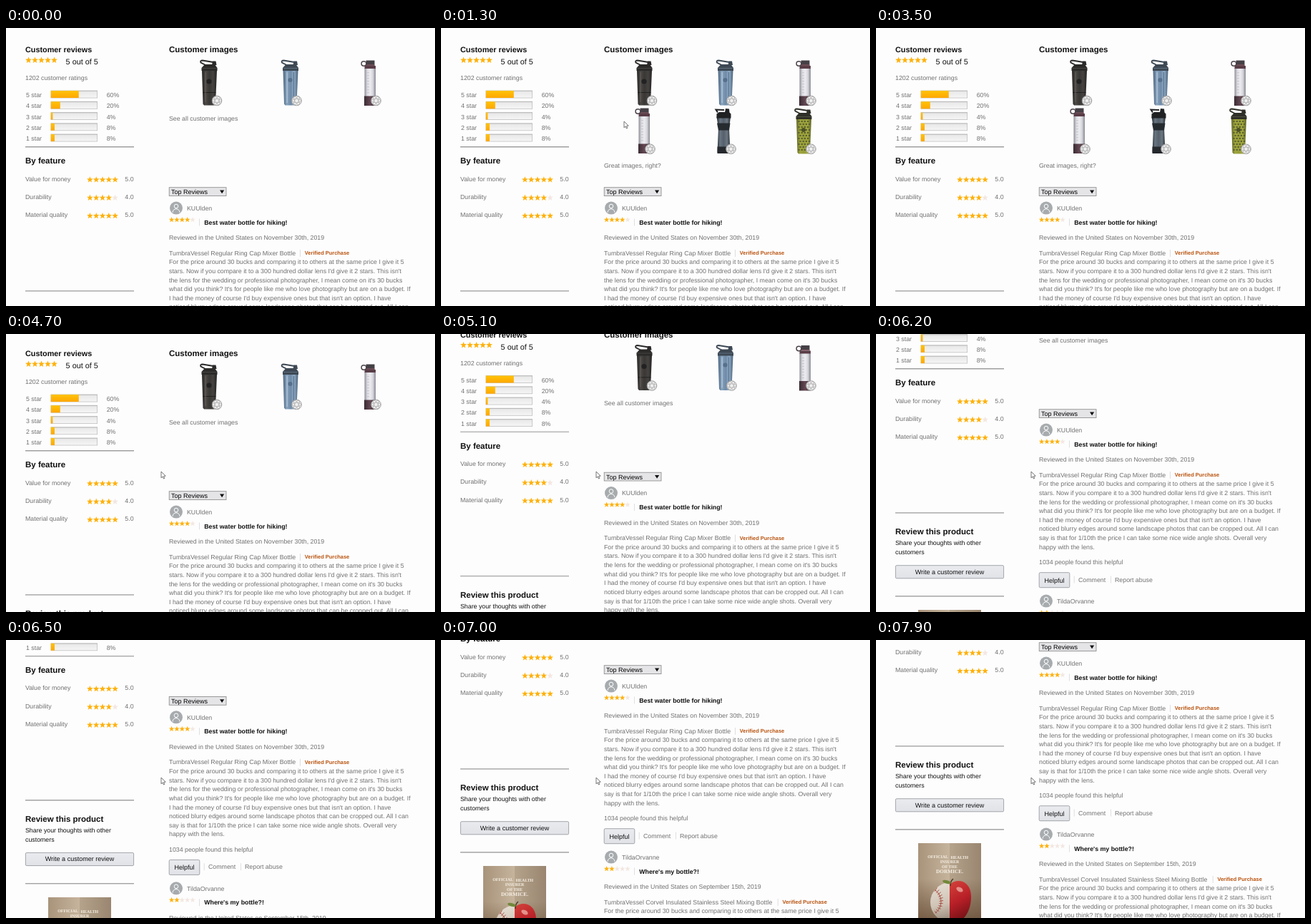
An HTML page with a canvas that plays this animation: 600x390 px, repeating every 8 s.

```html
<!DOCTYPE html>
<html lang="en">
<head>
<meta charset="utf-8">
<title>Customer reviews</title>
<style>
html, body { margin: 0; width: 100%; height: 100%; overflow: hidden; background: #fdfdfe; }
canvas { display: block; width: 600px; height: 390px; }
</style>
</head>
<body>
<canvas id="stage"></canvas>
<script>
const LOOP = 8000, STEP = 100, W = 600, H = 390;
const GRAY = '#707070', INK = '#111', GOLD = '#ffb10a', PALE = '#f3e7e0';
const SANS = '"Liberation Sans", Arial, sans-serif';
const SERIF = '"Liberation Serif", Times, serif';

const canvas = document.getElementById('stage');
const dpr = window.devicePixelRatio || 1;
canvas.width = W * dpr;
canvas.height = H * dpr;
const c = canvas.getContext('2d');
c.textRendering = 'geometricPrecision';

const OPEN_AT = 900, CLOSE_AT = 4200;
const scrollKeys = [[4600, 0], [4800, 6], [5100, 29.5], [5300, 47], [5400, 47],
  [6200, 118], [7000, 188], [7400, 209], [7900, 220]];
// time, x, y of the pointer tip; two separate visits
const visits = [
  [[500, 322, 385], [800, 256, 131], [1400, 256, 131], [1700, 318, 388]],
  [[3600, 330, 360], [4000, 256, 194], [4200, 256, 194], [4400, 217, 193], [LOOP, 217, 193]]
];
const reviewLines = [
  'For the price around 30 bucks and comparing it to others at the same price I give it 5',
  "stars. Now if you compare it to a 300 hundred dollar lens I'd give it 2 stars. This isn't",
  "the lens for the wedding or professional photographer, I mean come on it's 30 bucks",
  "what did you think? It's for people like me who love photography but are on a budget. If",
  "I had the money of course I'd buy expensive ones but that isn't an option. I have",
  'noticed blurry edges around some landscape photos that can be cropped out. All I can',
  'say is that for 1/10th the price I can take some nice wide angle shots. Overall very',
  'happy with the lens.'
];

function track(keys, t, i = 1) {
  if (t <= keys[0][0]) return keys[0][i];
  for (let k = 1; k < keys.length; k++) {
    const a = keys[k - 1], b = keys[k];
    if (t <= b[0]) return a[i] + (b[i] - a[i]) * (t - a[0]) / (b[0] - a[0]);
  }
  return keys[keys.length - 1][i];
}

function text(str, x, y, { size = 8.8, color = GRAY, bold = false, align = 'left', font = SANS } = {}) {
  c.font = `${bold ? 'bold ' : ''}${size}px ${font}`;
  c.fillStyle = color;
  c.textAlign = align;
  c.fillText(str, x, y);
}

function rect(x, y, w, h, color) {
  c.fillStyle = color;
  c.fillRect(x, y, w, h);
}

function disc(x, y, r, color) {
  c.fillStyle = color;
  c.beginPath();
  c.arc(x, y, r, 0, Math.PI * 2);
  c.fill();
}

function poly(points, color) {
  c.fillStyle = color;
  c.beginPath();
  points.forEach(([x, y]) => c.lineTo(x, y));
  c.closePath();
  c.fill();
}

function blend(x0, y0, x1, y1, ...colors) {
  const g = c.createLinearGradient(x0, y0, x1, y1);
  colors.forEach((col, i) => g.addColorStop(i / (colors.length - 1), col));
  return g;
}

function stroke(color, width, draw) {
  c.strokeStyle = color;
  c.lineWidth = width;
  c.beginPath();
  draw();
  c.stroke();
}

function placed(x, y, draw) {
  c.save();
  c.translate(x, y);
  draw();
  c.restore();
}

function stars(x, y, r, pitch, score) {
  for (let n = 0; n < 5; n++) {
    const pts = [];
    for (let k = 0; k < 10; k++) {
      const a = -Math.PI / 2 + k * Math.PI / 5, q = k % 2 ? r * 0.42 : r;
      pts.push([x + n * pitch + q * Math.cos(a), y + q * Math.sin(a)]);
    }
    poly(pts, n < score ? GOLD : PALE);
  }
}

function rule(y) {
  rect(27, y, 152, 0.8, '#888');
  rect(27, y + 0.8, 152, 0.7, '#bbb');
}

const divider = (x, y) => rect(x, y, 0.8, 10, '#d8d8d8');

function button(x, y, w, h, label, baseline) {
  c.fillStyle = blend(0, y, 0, y + h, '#eaebef', '#e0e2e7');
  c.beginPath();
  c.roundRect(x + 0.4, y + 0.4, w - 0.8, h - 0.8, 1.5);
  c.fill();
  c.strokeStyle = '#8f9296';
  c.lineWidth = 0.8;
  c.stroke();
  text(label, x + w / 2, baseline, { size: 9.03, color: INK, align: 'center' });
}

function ratings() {
  text('Customer reviews', 27, 34, { size: 10.83, color: INK, bold: true });
  stars(31.5, 45.2, 4.7, 9, 5);
  text('5 out of 5', 83.6, 51.3, { size: 10.83, color: INK });
  text('1202 customer ratings', 27, 73.2);
  [60, 20, 4, 8, 8].forEach((pct, i) => {
    const y = 87.6 + i * 15.25;
    text(`${5 - i} star`, 28, y + 9.4);
    rect(62.6, y, 65.4, 10.8, '#b9b9b9');
    rect(63.3, y + 1.2, 64, 8.9, blend(0, y, 0, y + 10, '#e6e6e6', '#f5f5f5'));
    rect(62.8, y + 0.4, pct * 0.65, 10, blend(0, y, 0, y + 10, '#ffc40a', '#ffa800'));
    text(`${pct}%`, 140.7, y + 9.4);
  });
  rule(166.2);
  text('By feature', 27, 190.2, { size: 11.5, color: INK, bold: true });
  [['Value for money', 5], ['Durability', 4], ['Material quality', 5]].forEach(([label, score], i) => {
    const y = 214.6 + i * 25.3;
    text(label, 27, y);
    stars(117.4, y - 1.7, 4.6, 8.8, score);
    text(score.toFixed(1), 166.3, y);
  });
  rule(368.4);
}

// left half ball, right half apple; origin at the top of the seam
function poster() {
  c.beginPath();
  c.rect(-44, 0, 88, 116);
  c.clip();
  rect(-44, 0, 44, 116, blend(-44, 0, 0, 0, '#a8937a', '#c6b49d'));
  rect(0, 0, 44, 116, blend(0, 0, 44, 0, '#b5a38c', '#9a8670'));
  rect(-44, 50, 88, 66, blend(0, 50, 0, 116, 'rgba(90,62,40,0)', 'rgba(90,62,40,.75)'));
  const cream = { size: 5.9, color: '#f7f1e6', bold: true, font: SERIF };
  text('OFFICIAL', -2, 21, { ...cream, align: 'right' });
  text('HEALTH', 1.5, 22, cream);
  text('INSURER', 0, 28.3, { ...cream, align: 'center' });
  text('OF THE', 0, 35, { ...cream, align: 'center' });
  text('DORMICE.', 0, 42.3, { ...cream, size: 7.3, align: 'center' });

  c.save();
  c.beginPath();
  c.rect(-44, 0, 44, 116);
  c.clip();
  disc(1, 83, 28, blend(-14, 58, 0, 112, '#e3dbd0', '#cfc4b6', '#8f7f70'));
  stroke('#a4473c', 0.9, () => c.arc(-32, 82, 20, -0.95, 0.95));
  for (let a = -0.9; a <= 0.9; a += 0.18) {
    const ux = Math.cos(a), uy = Math.sin(a);
    stroke('#a4473c', 0.9, () => {
      c.moveTo(-32 + 17.5 * ux, 81.5 + 17.5 * uy);
      c.lineTo(-32 + 23 * ux, 80.5 + 23 * uy);
    });
  }
  c.restore();

  c.fillStyle = blend(0, 55, 28, 105, '#d2413a', '#b81f27', '#6d1015');
  c.beginPath();
  c.moveTo(0, 58);
  c.bezierCurveTo(11, 48, 30, 53, 30, 75);
  c.bezierCurveTo(30, 96, 19, 114, 0, 113);
  c.fill();
  c.fillStyle = 'rgba(255,225,212,.55)';
  c.beginPath();
  c.ellipse(14, 65, 5, 3, 0.5, 0, 7);
  c.fill();
  stroke('#4a3322', 1.3, () => { c.moveTo(1, 60); c.quadraticCurveTo(1, 53, 5, 50); });
  c.fillStyle = '#71883a';
  c.beginPath();
  c.ellipse(-4, 54.5, 6, 2.4, 0.25, 0, 7);
  c.fill();
}

function sharePanel() {
  text('Review this product', 27, 399.3, { size: 11.5, color: INK, bold: true });
  text('Share your thoughts with other', 27, 414.3, { color: INK });
  text('customers', 27, 427, { color: INK });
  button(27, 442.3, 152, 18.9, 'Write a customer review', 454.7);
  rule(485.3);
  placed(103, 505, poster);
}

function whisk(x, y) {
  placed(x, y, () => {
    disc(0, 0, 7, '#f0f0f0');
    stroke('#8d8d8d', 0.8, () => c.arc(0, 0, 6.8, 0, 7));
    for (let k = 0; k < 3; k++) {
      c.rotate(Math.PI / 3);
      stroke('#a2a2a2', 0.6, () => c.ellipse(0, 0, 6.6, 2.6, 0, 0, 7));
    }
  });
}

// bottles are drawn around x = 0 from their top at y = 0
function loopLid(color, shine) {
  poly([[-10.5, 16], [-10.5, 12], [-6, 7], [8, 7], [11.5, 12], [11.5, 16]], color);
  poly([[4, 8], [5, 2.5], [9.5, 2.5], [10.5, 8]], color);
  stroke(color, 1.9, () => {
    c.moveTo(-5, 8);
    c.lineTo(-11.5, 4.5);
    c.quadraticCurveTo(-13, 1.5, -9, 1.5);
    c.lineTo(6, 4);
  });
  stroke(shine, 0.7, () => { c.moveTo(-9.5, 12.5); c.lineTo(10.5, 12.5); });
}

const taperedBody = (...tones) =>
  poly([[-10, 15], [11, 15], [9, 62.5], [7.5, 64.5], [-7, 64.5], [-8.5, 62.5]], blend(-10, 0, 11, 0, ...tones));

function blackBottle() {
  taperedBody('#252423', '#4b4845', '#3a3836', '#454240', '#232222');
  loopLid('#2b2a29', '#55524f');
  rect(-9, 46, 18.5, 0.8, '#1b1b1b');
  rect(-5.5, 18, 1, 42, '#65615d');
  disc(0, 31, 3.6, '#222');
}

function blueBottle() {
  taperedBody('#4b647d', '#8aa5c0', '#6f8aa6', '#8ea9c4', '#486077');
  loopLid('#3d4854', '#6f7f90');
  rect(-5, 18, 1.2, 43, '#b4c9dd');
  rect(4.5, 18, 1, 43, '#56708b');
  disc(0, 29, 3, '#56708c');
}

function clearBottle() {
  rect(-7, 12, 15.5, 42, blend(-7, 0, 8.5, 0, '#8d8d96', '#dcdce2', '#ececf0', '#d6d6dd', '#888891'));
  for (let y = 18; y < 50; y += 4) rect(-3.5, y, 3, 0.6, '#b4b4bc');
  rect(-7.5, 51, 16.5, 13.5, blend(-7.5, 0, 9, 0, '#392c33', '#654853', '#352930'));
  rect(-5, 1, 12, 7.5, '#454046');
  rect(-7, 8.5, 15.5, 4, '#593d47');
  rect(-5, 7, 12, 1, '#935b66');
  stroke('#4a4147', 1.5, () => c.ellipse(-8, 5.5, 3.4, 3.2, 0, 0, 7));
}

function gripBottle() {
  poly([[-9.5, 13], [10, 13], [8, 29], [9.5, 63], [-8.5, 63], [-7, 29]],
    blend(-9.5, 0, 10, 0, '#20262b', '#687581', '#55606b', '#6b7782', '#1e2429'));
  poly([[-9, 22], [9.5, 22], [8, 32], [-7, 32]], '#262b30');
  rect(-8.5, 55, 18, 9.5, '#25292d');
  poly([[-9.5, 15], [-9.5, 9], [-6, 6.5], [8, 6.5], [10.5, 9], [10.5, 15]], '#1f2123');
  stroke('#1f2123', 2, () => { c.moveTo(-8, 7); c.lineTo(-10.5, 3); c.lineTo(1, 3.5); });
  poly([[2, 7], [3, 1.5], [8, 2], [8.5, 7]], '#1f2123');
}

function greenBottle() {
  taperedBody('#5f6526', '#a0a63e', '#979d3b', '#a0a63e', '#5c6225');
  for (let r = 0; r < 11; r++)
    for (let k = 0; k < 4; k++)
      rect(-7.5 + k * 4.2 + (r % 2) * 2, 18 + r * 4, 2.1, 1.9, '#555b2b');
  loopLid('#2e2f27', '#5d5f4c');
  disc(0, 31, 3, '#4c5127');
}

function gallery(open) {
  text('Customer images', 228, 34.2, { size: 11.5, color: INK, bold: true });
  placed(284, 44, blackBottle);
  placed(397.5, 44, blueBottle);
  placed(508.5, 44.5, clearBottle);
  [295, 406.5, 517.5].forEach(x => whisk(x, 102));
  if (!open) return text('See all customer images', 228, 129.5);
  placed(283.5, 111.5, clearBottle);
  placed(395, 111.5, gripBottle);
  placed(507, 112, greenBottle);
  [292.5, 405.5, 517.5].forEach(x => whisk(x, 169.8));
  text('Great images, right?', 228, 196.2);
}

function sorter() {
  rect(227.8, 223.3, 80.6, 12.6, '#868686');
  rect(228.6, 224.1, 79, 11, '#e5e5e8');
  text('Top Reviews', 231, 233, { size: 9.03, color: '#000' });
  poly([[299, 227.4], [305.2, 227.4], [302.1, 232.2]], '#111');
}

function review(dy, who, score, title, date, item, tagX) {
  placed(0, dy, () => {
    disc(238, 252.6, 9, '#a7abae');
    stroke('#fff', 1, () => c.arc(238, 250, 2.8, 0, 7));
    stroke('#fff', 1, () => c.arc(238, 258.7, 4.9, Math.PI, 0));
    text(who, 253, 255.8);
    stars(231.6, 269, 4, 7.35, score);
    divider(270.2, 267.5);
    text(title, 277.2, 275.6, { color: INK, bold: true });
    text(`Reviewed in the United States on ${date}`, 228, 297);
    text(item, 228, 318.6);
    divider(tagX - 6.6, 311);
    text('Verified Purchase', tagX, 318.4, { size: 7.45, color: '#b9540f', bold: true });
    reviewLines.forEach((line, i) => text(line, 228, 331.3 + i * 12.62));
    text('1034 people found this helpful', 228, 441);
    button(227.8, 452.3, 43.4, 21.8, 'Helpful', 466.6);
    divider(276.8, 457.5);
    text('Comment', 283, 465.6);
    divider(328, 457.5);
    text('Report abuse', 334, 465.6);
  });
}

function pointer(x, y) {
  placed(x, y, () => {
    poly([[0, 0], [0, 8.8], [2, 7], [3.4, 10], [4.8, 9.4], [3.5, 6.4], [6.2, 6.2]], '#fff');
    c.strokeStyle = '#555';
    c.lineWidth = 0.8;
    c.stroke();
  });
}

function draw(t) {
  c.setTransform(dpr, 0, 0, dpr, 0, 0);
  rect(0, 0, W, H, '#fdfdfe');
  placed(0, -track(scrollKeys, t), () => {
    ratings();
    sharePanel();
    gallery(t >= OPEN_AT && t < CLOSE_AT);
    sorter();
    review(0, 'KUUlden', 4, 'Best water bottle for hiking!', 'November 30th, 2019',
      'TumbraVessel Regular Ring Cap Mixer Bottle', 417.8);
    review(240, 'TildaOrvanne', 2, "Where's my bottle?!", 'September 15th, 2019',
      'TumbraVessel Corvel Insulated Stainless Steel Mixing Bottle', 477.4);
  });
  const visit = visits.find(v => t >= v[0][0] && t <= v[v.length - 1][0]);
  if (visit) pointer(track(visit, t, 1), track(visit, t, 2));
}

const start = performance.now();
function tick() {
  const t = (performance.now() - start) % LOOP;
  draw(Math.floor(t / STEP) * STEP);
  requestAnimationFrame(tick);
}
tick();
</script>
</body>
</html>
```
